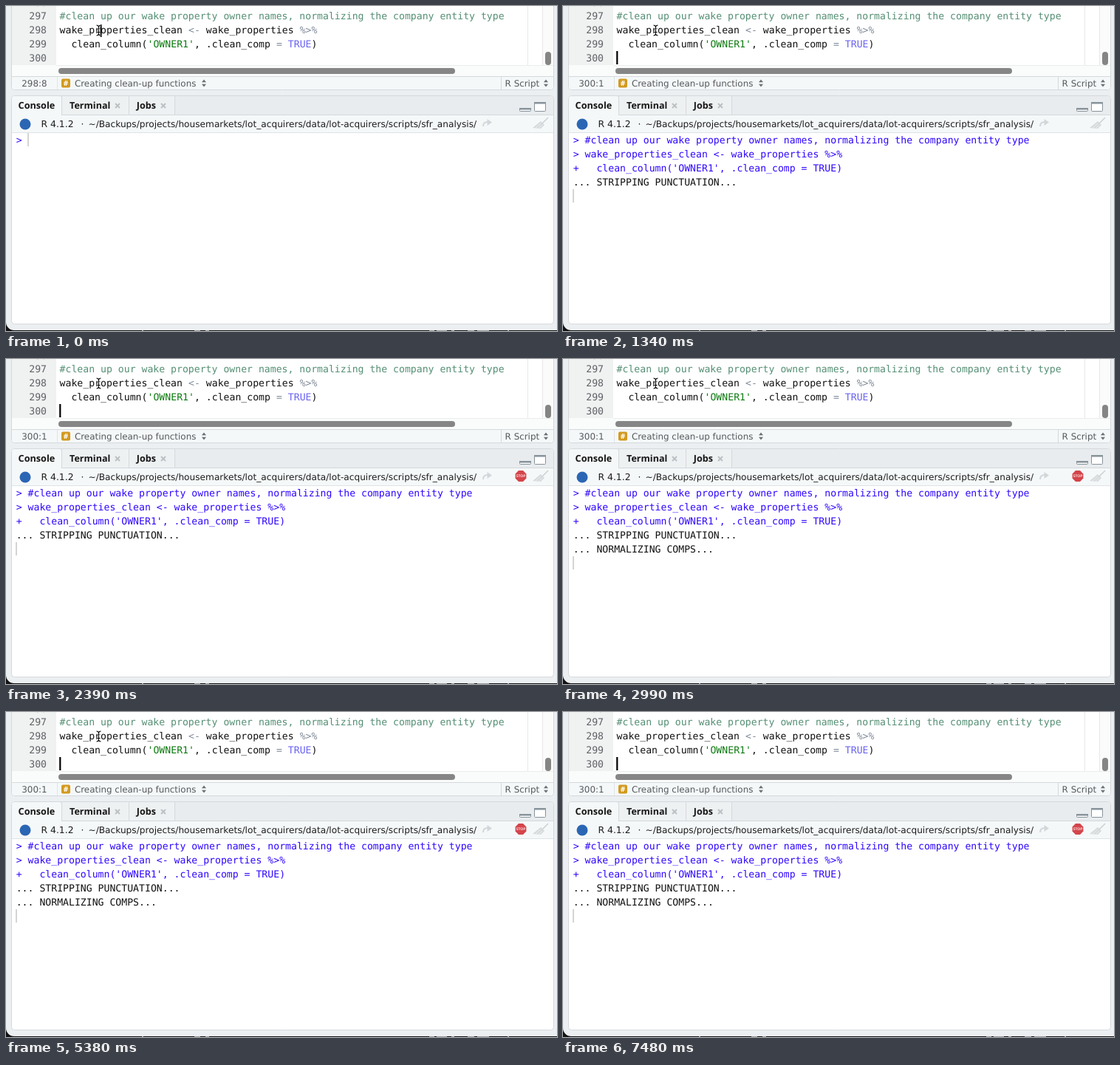
Animation, 746 px wide and 440 px high, one loop 8000 ms. Source, as an HTML page with a canvas:

```html
<!DOCTYPE html>
<html lang="en">
<head>
<meta charset="utf-8">
<title>Console run</title>
<style>
html, body { margin: 0; width: 746px; height: 440px; overflow: hidden; background: #eceff1; }
canvas { display: block; }
</style>
</head>
<body>
<canvas id="stage" width="746" height="440"></canvas>
<script>
const ctx = document.getElementById('stage').getContext('2d');
ctx.textRendering = 'geometricPrecision';

const LOOP = 8000;
const RUN = 1340, STOP_FADE = 2240, STOP_FULL = 2390, SECOND_STEP = 2690;
const NUDGE = 7030, MOVE = 7180, HIDE = 7330;
const CARET_OFF = [[150, 450], [1040, 1340], [2090, 2390], [2990, 3440],
                   [4040, 4490], [5090, 5380], [5980, 6430], [7030, 7480]];

const MONO_SIZE = 13.17;
const MONO = `${MONO_SIZE}px "DejaVu Sans Mono", monospace`;
const CHAR = MONO_SIZE * 0.602;
const ui = size => `${size}px "DejaVu Sans", sans-serif`;
const bold = size => `700 ${size}px "Noto Sans", sans-serif`;

const INK = '#111', COMMENT = '#548f74', OPERATOR = '#7f8a99';
const STRING = '#0b7a0e', CONSTANT = '#6a63f0', INPUT = '#3007ff';
const LINE = '#d5d9dc', CHROME = '#eceff1', BAR = '#f5f8f9';

function rect(x, y, w, h, color) {
  ctx.fillStyle = color;
  ctx.fillRect(x, y, w, h);
}

function round(x, y, w, h, r, fill, stroke) {
  ctx.beginPath();
  ctx.roundRect(x, y, w, h, r);
  if (fill) { ctx.fillStyle = fill; ctx.fill(); }
  if (stroke) { ctx.strokeStyle = stroke; ctx.lineWidth = 1; ctx.stroke(); }
}

function text(str, x, y, font, color, align = 'left') {
  ctx.font = font;
  ctx.fillStyle = color;
  ctx.textAlign = align;
  ctx.fillText(str, x, y);
}

function polygon(points, color) {
  ctx.beginPath();
  points.forEach(([x, y]) => ctx.lineTo(x, y));
  ctx.closePath();
  ctx.fillStyle = color;
  ctx.fill();
}

function stroke(d, color, width) {
  ctx.strokeStyle = color;
  ctx.lineWidth = width;
  ctx.stroke(new Path2D(d));
}

// Colored runs laid end to end on the monospace grid.
function code(runs, x, y) {
  let column = 0;
  for (const [str, color] of runs) {
    text(str, x + column * CHAR, y, MONO, color);
    column += str.length;
  }
}

function sortArrows(x, y) {
  polygon([[x - 3, y - 1.3], [x + 3, y - 1.3], [x, y - 5]], '#6b6f73');
  polygon([[x - 3, y + 1.3], [x + 3, y + 1.3], [x, y + 5]], '#6b6f73');
}

function closeMark(x, y) {
  stroke(`M${x - 3} ${y - 3}l6 6m0 -6l-6 6`, '#bcc0c3', 2);
}

function drawEditor(t) {
  round(7.5, -10, 734, 123.5, 4, '#fff', LINE);
  rect(8, 0, 60, 80, '#f0f1f1');
  rect(706, 0, 1, 80, '#e6e8e9');
  rect(726, 0, 1, 80, '#e8e8e8');
  rect(727, 0, 14, 80, '#fbfbfb');
  rect(8, 80, 733, 16, '#fafbfb');
  rect(68, 80, 673, 1, '#ebecec');
  round(730, 62, 8, 18, 4, '#858585');
  round(71, 84, 537, 8, 4, '#868686');

  const baseline = n => 18.4 + (n - 297) * 18.7;
  for (let n = 296; n <= 300; n++) text(String(n), 55, baseline(n), MONO, '#5f6366', 'right');

  code([['#clean up our wake property owner names, normalizing the company entity type', COMMENT]],
    72.6, baseline(297));
  code([['wake_properties_clean ', INK], ['<-', OPERATOR], [' wake_properties ', INK], ['%>%', OPERATOR]],
    72.6, baseline(298));
  code([['  clean_column(', INK], ["'OWNER1'", STRING], [', .clean_comp ', INK], ['=', OPERATOR],
    [' ', INK], ['TRUE', CONSTANT], [')', INK]], 72.6, baseline(299));

  if (!CARET_OFF.some(([from, to]) => t >= from && t < to)) {
    if (t < RUN) rect(127.6, 25, 2, 17, '#000');
    else rect(72.2, 61, 2.2, 18, '#000');
  }
}

function drawStatus(t) {
  round(8, 96, 733, 17, [0, 0, 4, 4], BAR);
  rect(8, 95, 733, 1, LINE);
  rect(69, 96, 1, 17, '#e1e4e6');
  rect(670, 96, 1, 17, LINE);
  text(t < RUN ? '298:8' : '300:1', 21.3, 109, ui(11.9), '#55595c');
  round(75, 98.5, 12, 12, 2, '#d39a1f');
  text('#', 81, 108.3, bold(10), '#fff', 'center');
  text('Creating clean-up functions', 92.9, 109, ui(11.92), '#55595c');
  sortArrows(268, 104.5);
  text('R Script', 675.6, 109, ui(11.9), '#55595c');
  sortArrows(731, 104.5);
}

function drawStop(t) {
  if (t < STOP_FADE) return;
  ctx.globalAlpha = t < STOP_FULL ? 0.6 : 1;
  const corners = Array.from({ length: 8 }, (_, i) => {
    const a = (i + 0.5) * Math.PI / 4;
    return [697 + 8 * Math.cos(a), 158.5 + 8 * Math.sin(a)];
  });
  polygon(corners, '#d4454b');
  text('STOP', 697, 160.4, bold(5), '#fbdcdd', 'center');
  ctx.globalAlpha = 1;
}

function drawConsole(t) {
  round(7.5, 121.5, 734, 309, 4, '#fff', LINE);
  round(8, 122, 733, 25, [4, 4, 0, 0], '#e9ecee');
  rect(8, 147, 733, 1, LINE);
  round(8, 122, 67, 26, [4, 4, 0, 0], BAR);
  rect(8, 148, 733, 23, BAR);
  rect(8, 171, 733, 1, '#dfe3e5');
  rect(75, 122, 1, 25, LINE);
  rect(76, 122, 152, 25, '#eef1f2');
  rect(166, 122, 1, 25, LINE);
  rect(228, 122, 1, 25, LINE);

  text('Console', 16.6, 139.4, bold(12.65), '#161616');
  text('Terminal', 86, 139.4, bold(12.55), '#161616');
  text('Jobs', 176.8, 139.4, bold(12.65), '#161616');
  closeMark(151, 135);
  closeMark(213, 135);

  round(695.5, 138.5, 15, 4, 1, '#fff', '#87939b');
  rect(695, 138, 16, 2.5, '#87939b');
  round(715.5, 130.5, 15, 12, 1, '#fff', '#87939b');
  rect(715, 130, 16, 2.5, '#87939b');

  ctx.beginPath();
  ctx.arc(26, 160, 7.5, 0, Math.PI * 2);
  ctx.fillStyle = '#2b66b4';
  ctx.fill();
  text('R 4.1.2', 47.5, 163.5, ui(12.4), '#1c1c1c');
  text('·', 103.5, 163.5, ui(12.4), '#1c1c1c', 'center');
  text('~/Backups/projects/housemarkets/lot_acquirers/data/lot-acquirers/scripts/sfr_analysis/',
    111.5, 163.5, ui(12.16), '#1c1c1c');

  stroke('M646 163c0 -4.5 2.5 -6 6 -6', '#d3d7da', 2);
  polygon([[651.5, 153], [658, 157.5], [651.5, 162]], '#d3d7da');
  stroke('M734 151l-8 8', '#cdd1d3', 1.6);
  polygon([[724, 156], [729, 161], [724, 166], [713, 165]], '#d7dadc');
  stroke('M717 165l7 -6m-3 6.5l5 -4.5', '#f1f3f4', 0.8);

  const lines = t < RUN ? [['> ', INPUT]] : [
    ['> #clean up our wake property owner names, normalizing the company entity type', INPUT],
    ['> wake_properties_clean <- wake_properties %>%', INPUT],
    ["+   clean_column('OWNER1', .clean_comp = TRUE)", INPUT],
    ['... STRIPPING PUNCTUATION...', INK]
  ];
  if (t >= SECOND_STEP) lines.push(['... NORMALIZING COMPS...', INK]);
  lines.forEach((run, i) => code([run], 13.7, 186 + 18.9 * i));

  if (t < RUN) rect(29.5, 172, 1, 18, '#a9a9a9');
  else rect(13.5, 172 + 19 * lines.length, 1, 18, '#a9a9a9');
  drawStop(t);
}

function drawPointer(t) {
  if (t >= HIDE) return;
  const [x, y] = t < NUDGE ? [125.5, 25] : t < MOVE ? [126.5, 24.5] : [324, 39.5];
  const beam = `M${x - 3} ${y + 1}q2.5 0 3 2q.5 -2 3 -2M${x} ${y + 2.5}v11` +
    `M${x - 3} ${y + 15}q2.5 0 3 -2q.5 2 3 2M${x - 2} ${y + 10.5}h4`;
  stroke(beam, 'rgba(255,255,255,.75)', 2.4);
  stroke(beam, '#000', 1.1);
}

function drawWindow() {
  rect(0, 0, 746, 440, '#111');
  round(0, -20, 760, 459, 11, CHROME);
  for (const [x, w] of [[184, 2], [255, 8], [270, 5], [573, 7], [583, 14], [603, 4], [625, 9], [638, 16], [679, 2]])
    rect(x, 439, w, 1, '#999');
}

function frame(now) {
  const t = now % LOOP;
  drawWindow();
  drawEditor(t);
  drawStatus(t);
  drawConsole(t);
  drawPointer(t);
  requestAnimationFrame(frame);
}

frame(0);
</script>
</body>
</html>
```
